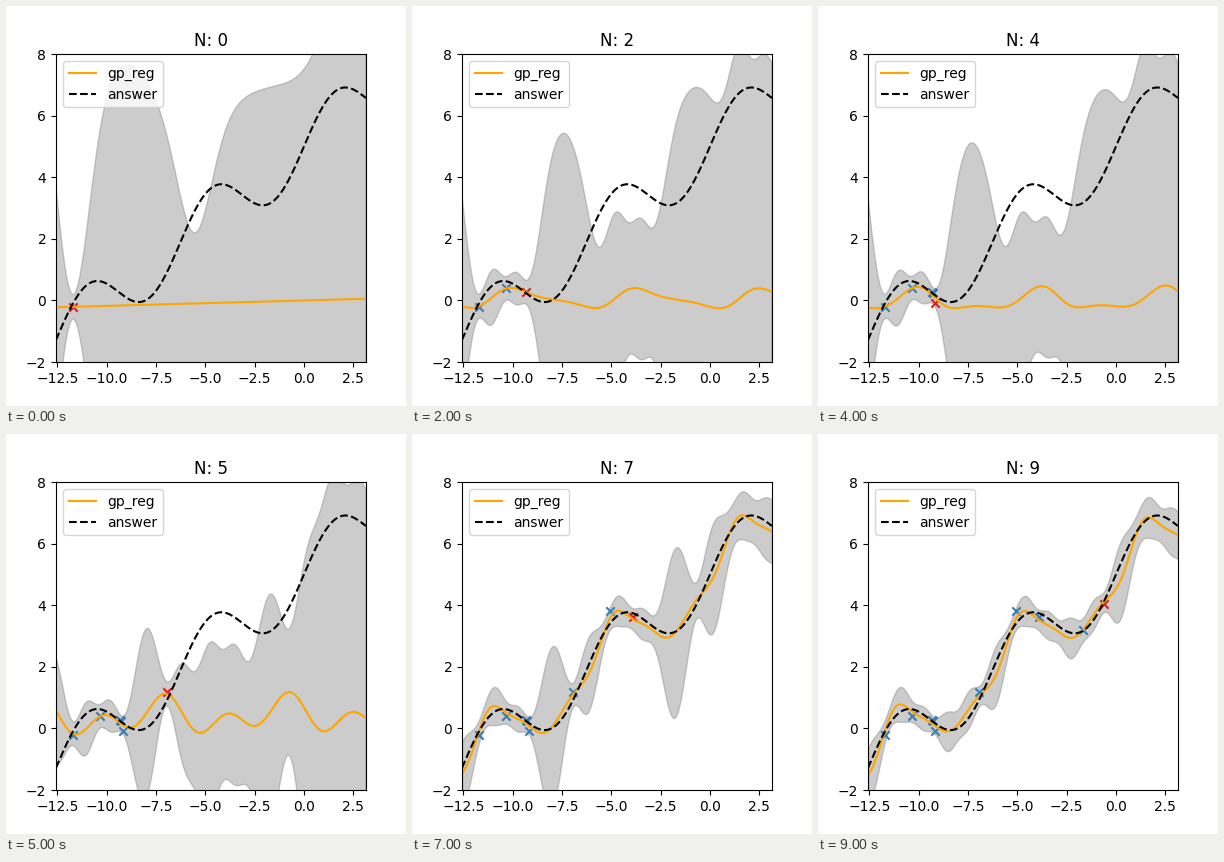
Recreate the animation shown at these times as a matplotlib script. Size 400 by 400 pixels, loop 10000 ms.

```python
import numpy as np
import matplotlib.pyplot as plt
from matplotlib.animation import FuncAnimation

NOISE = 0.1
BLUE, RED = "#377eb8", "#e41a1c"

# Key points: one (x, y) observation per second, left to right
px, py = np.array([
    (-11.70, -0.21), (-10.33, 0.41), (-9.31, 0.26), (-9.26, 0.23),
    (-9.18, -0.08), (-6.93, 1.17), (-5.08, 3.81), (-3.90, 3.63),
    (-1.67, 3.21), (-0.61, 4.05),
]).T

grid = np.linspace(-4 * np.pi, np.pi, 300)
answer = grid / 2 + np.sin(grid) + 5


def kernel(a, b):
    """Bias + linear + periodic covariance."""
    return 1 + a * b + np.exp(np.cos(a - b))


def predict(x, y):
    """Posterior mean and predictive variance on the grid."""
    cov = kernel(x[:, None], x) + NOISE * np.eye(len(x))
    cross = kernel(x[:, None], grid)
    gain = np.linalg.solve(cov, cross)
    var = kernel(grid, grid) - np.sum(cross * gain, axis=0) + NOISE
    return y @ gain, var


fig, ax = plt.subplots(figsize=(4, 4), dpi=100)


def draw(i):
    mean, var = predict(px[:i + 1], py[:i + 1])
    ax.clear()
    ax.fill_between(grid, mean - 2 * var, mean + 2 * var,
                    color="gray", alpha=0.4)
    ax.scatter(px[:i], py[:i], marker="x", color=BLUE)
    ax.scatter(px[i], py[i], marker="x", color=RED)
    ax.plot(grid, mean, color="orange", label="gp_reg")
    ax.plot(grid, answer, color="black", linestyle="--", label="answer")
    ax.set_xlim(grid[0], grid[-1])
    ax.set_ylim(-2, 8)
    ax.set_title(f"N: {i}")
    ax.legend(loc="upper left")
    return []


anim = FuncAnimation(fig, draw, frames=len(px), interval=1000,
                     init_func=lambda: draw(0), repeat=True, repeat_delay=0)
plt.show()
```
